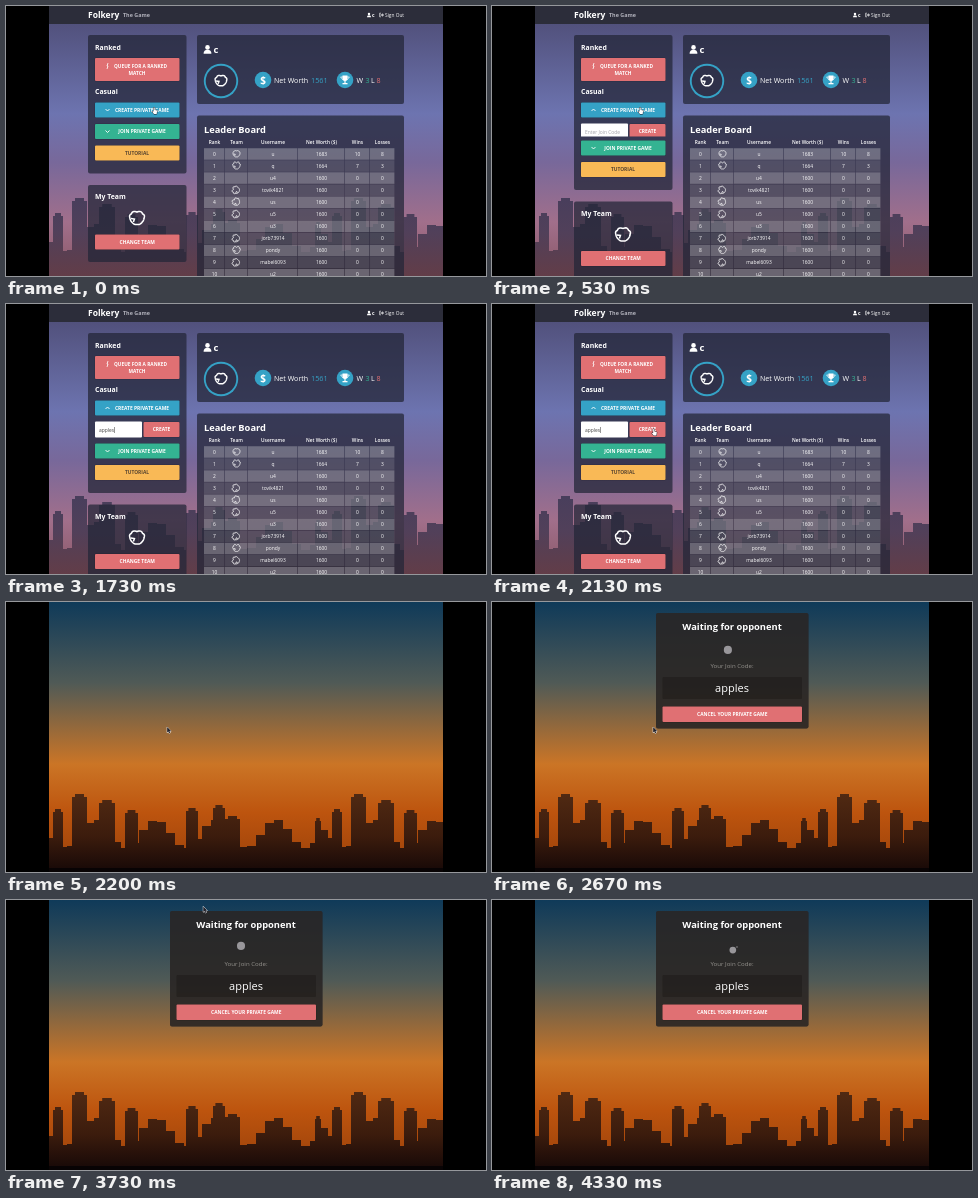
Recreate the animation shown at these times as an HTML page with a canvas. Size 480 by 270 pixels, loop 4390 ms.

```html
<!DOCTYPE html>
<html lang="en">
<head>
<meta charset="utf-8">
<title>Private game lobby</title>
<style>
html, body { margin: 0; width: 100%; height: 100%; overflow: hidden; background: #000; }
canvas { display: block; width: 480px; height: 270px; }
</style>
</head>
<body>
<canvas id="stage"></canvas>
<script>
const LOOP = 4390, TAU = Math.PI * 2;
const W = 480, H = 270, LEFT = 43, RIGHT = 437;
const FONT = '"Open Sans", "Noto Sans", sans-serif';
const RED = '#e07073', BLUE = '#35a2c6', GREEN = '#34b392', YELLOW = '#f9b956';

const canvas = document.getElementById('stage');
const ctx = canvas.getContext('2d');
const dpr = window.devicePixelRatio || 1;
canvas.width = W * dpr;
canvas.height = H * dpr;

const clamp = v => Math.max(0, Math.min(1, v));
const ease = v => { v = clamp(v); return v * v * (3 - 2 * v); };
const span = (t, a, b) => ease((t - a) / (b - a));
const mix = (a, b, k) => a + (b - a) * k;

function rect(x, y, w, h, fill, r = 0) {
  ctx.fillStyle = fill;
  ctx.beginPath();
  ctx.roundRect(x, y, w, h, r);
  ctx.fill();
}

function disc(x, y, r, fill) {
  ctx.fillStyle = fill;
  ctx.beginPath();
  ctx.arc(x, y, r, 0, TAU);
  ctx.fill();
}

function text(s, x, y, size, { color = '#fff', weight = 500, align = 'left' } = {}) {
  ctx.font = `${weight} ${size}px ${FONT}`;
  ctx.textAlign = align;
  ctx.fillStyle = color;
  ctx.fillText(s, x, y + size * 0.36);
}

const bold = (s, x, y, size, align = 'left', color = '#fff') =>
  text(s, x, y, size, { weight: 700, align, color });
const centered = (s, x, y, size, color) => text(s, x, y, size, { align: 'center', color });

function line(points, width = 1, color = '#fff') {
  ctx.strokeStyle = color;
  ctx.lineWidth = width;
  ctx.beginPath();
  points.forEach(([x, y]) => ctx.lineTo(x, y));
  ctx.stroke();
}

function fillSky(stops) {
  rect(LEFT, 0, RIGHT - LEFT, H, gradient(0, stops));
}

function gradient(top, stops) {
  const g = ctx.createLinearGradient(0, top, 0, H);
  stops.forEach(([at, color]) => g.addColorStop(at, color));
  return g;
}

// Low roofs follow a stepped wave; a few capped towers [x, width, roof] stand out
const TILE = 279, STEP = 9;
const TOWERS = [[47, 10, 210], [66, 15, 195], [93, 16, 201], [119, 13, 211],
  [180, 12, 209], [207, 12, 206], [219, 15, 217], [309, 6, 219]];

function skyline(stops) {
  ctx.fillStyle = gradient(190, stops);
  ctx.beginPath();
  for (let left = 0; left <= TILE; left += TILE) {
    for (let x = LEFT; x < LEFT + TILE; x += STEP) {
      const roof = Math.round(232 + 14 * Math.cos((x + STEP / 2) / 60 * TAU));
      ctx.rect(left + x, roof, STEP, H - roof);
    }
    for (const [x, w, roof] of TOWERS) {
      ctx.rect(left + x, roof, w, H - roof);
      ctx.rect(left + x + w * 0.2, roof - 3, w * 0.6, 4);
    }
  }
  ctx.fill();
}

// Outline of a hand: a rounded palm with four bumps for the fingers
function hand(x, y, size, reach = 1.1, angle = 0, width = 1.5) {
  ctx.save();
  ctx.translate(x, y);
  ctx.rotate(angle);
  ctx.scale(size / 16, size / 16);
  const points = [];
  for (let a = 0; a <= TAU + 0.1; a += 0.1) {
    const r = 6.2 + reach * Math.max(0, -Math.sin(a)) * Math.abs(Math.sin(4 * a));
    const py = Math.min(5.8, r * Math.sin(a));
    points.push([r * Math.cos(a) * (1.1 - 0.03 * py), py]);
  }
  line(points, width);
  line([[-6, 0], [-2.5, 0.5], [-3.5, 3.5]], width);
  ctx.restore();
}

function person(x, y, s) {
  disc(x, y - s * 0.25, s * 0.27, '#fff');
  ctx.beginPath();
  ctx.arc(x, y + s * 0.5, s * 0.46, Math.PI, 0);
  ctx.fill();
}

function chevron(x, y, up) {
  const d = up ? -1 : 1;
  line([[x - 2, y - d], [x, y + d], [x + 2, y - d]], 0.9);
}

function button(label, x, y, w, h, color, tx = x + w / 2, ink = '#fff') {
  rect(x - 0.5, y - 0.5, w + 1, h + 1, 'rgba(0,0,0,.18)', 1.5);
  rect(x, y, w, h, color, 1);
  bold(label, tx, y + h / 2, 4.9, 'center', ink);
}

const sideButton = (label, y, color, tx, ink) => button(label, 89, y, 84.5, 15, color, tx, ink);
const panel = (x, y, w, h) => rect(x, y, w, h, 'rgba(36,38,56,.74)', 2);

const NAMES = 'u q u4 tovik4821 us u5 u3 jorb73914 pondy mabel6093 u2'.split(' ');
const SCORES = { u: [1683, 10, 8], q: [1664, 7, 3] };
const COLUMNS = { Rank: 21, Team: 23, Username: 50, 'Net Worth ($)': 47, Wins: 25, Losses: 25 };

function teamIcon(i, x, y) {
  if (i % 4 === 2) return;
  const open = i % 7 === 1;
  const angle = i === 0 || open ? 0 : i === 4 ? -0.7 : -1.3;
  hand(x, y, 8, i === 0 ? 1 : 2.6, angle);
}

function leaderBoard() {
  panel(191, 109.5, 207, 170);
  bold('Leader Board', 198, 123.5, 9.3);
  let left = 198;
  Object.entries(COLUMNS).forEach(([title, width], c) => {
    const mid = left + width / 2;
    text(title, mid, 136, 4.8, { weight: 600, align: 'center' });
    NAMES.forEach((name, i) => {
      const y = 148 + i * 12.07;
      rect(left, y - 5.8, width - 0.6, 11.5, `rgba(255,255,255,${i % 2 ? 0.12 : 0.27})`);
      if (c === 1) teamIcon(i, mid, y);
      else centered([i, '', name, ...(SCORES[name] || [1600, 0, 0])][c], mid, y, 4.9);
    });
    left += width;
  });
}

function trophy(x, y) {
  disc(x, y, 8.3, BLUE);
  rect(x - 2.5, y - 4.5, 5, 5.5, '#fff', [0, 0, 2.5, 2.5]);
  rect(x - 0.6, y, 1.2, 3.5, '#fff');
  rect(x - 2.5, y + 3, 5, 1.3, '#fff');
  for (const d of [-1, 1]) line([[x + 2 * d, y - 3], [x + 4.4 * d, y - 3], [x + 2 * d, y]], 0.7);
}

function profile() {
  panel(191, 29, 207, 69);
  person(201.5, 43.5, 8.5);
  bold('c', 207.5, 43.5, 9.5);
  disc(215, 75, 17.2, BLUE);
  disc(215, 75, 15.3, '#2f314a');
  hand(215, 75, 13, 1.1, 0, 1.8);
  disc(257, 74, 8.3, BLUE);
  bold('$', 257, 74, 10, 'center');
  text('Net Worth', 268, 74.5, 7.1);
  text('1561', 305, 74.5, 7.3, { color: BLUE });
  trophy(339, 74);
  text('W', 350.5, 74.5, 7.1);
  text('3', 359.5, 74.5, 7.1, { color: GREEN });
  text('L', 365, 74.5, 7.1);
  text('8', 370.5, 74.5, 7.1, { color: RED });
}

function joinForm(t) {
  rect(89, 117.5, 47, 16, '#fff', 1);
  button('CREATE', 137.5, 118, 36, 15, RED);
  const typed = 'apples'.slice(0, Math.max(0, Math.floor((t - 1150) / 85) + 1));
  text(typed || 'Enter Join Code', 93, 126, 4.9, { color: typed ? '#444' : '#a3a3aa' });
  if (t > 1000) rect(93.3 + ctx.measureText(typed).width, 123, 0.5, 6, '#333');
}

function sidebar(t) {
  const row = 21.5, open = row * span(t, 380, 600);
  panel(82, 29, 98.5, 138.5 + open);
  bold('Ranked', 89, 42, 6.9);
  button('', 89, 52, 84.5, 23, RED);
  bold('QUEUE FOR A RANKED', 134.5, 60, 4.8, 'center');
  bold('MATCH', 131, 67, 4.8, 'center');
  line([[102, 57], [101, 60], [102, 60], [101, 63]], 0.8);
  bold('Casual', 89, 86, 6.9);

  const top = 96.5, below = top + open;
  sideButton('CREATE PRIVATE GAME', top, BLUE, 136);
  chevron(101.5, top + 7.5, t > 380);
  ctx.save();
  ctx.beginPath();
  ctx.rect(82, 114, 98, open);
  ctx.clip();
  joinForm(t);
  ctx.restore();
  sideButton('JOIN PRIVATE GAME', below + row, GREEN, 136);
  chevron(101.5, below + row + 7.5);
  sideButton('TUTORIAL', below + 2 * row, YELLOW, 131, '#5a4630');

  panel(82, 179 + open, 98.5, 77);
  bold('My Team', 89, 191 + open, 6.9);
  hand(131, 212.5 + open, 16.5);
  sideButton('CHANGE TEAM', 228.5 + open, RED);
}

function navBar() {
  rect(LEFT, 0, RIGHT - LEFT, 18, '#2c2d3a');
  bold('Folkery', 82, 9, 8.5);
  bold('The Game', 117, 9.3, 5.4, 'left', '#b3b3bd');
  person(363, 9, 4.5);
  bold('c', 366, 9, 5);
  line([[375, 7.2], [373.6, 7.2], [373.6, 10.8], [375, 10.8]], 0.6);
  line([[374.5, 9], [377.3, 9]]);
  line([[376, 7.6], [377.5, 9], [376, 10.4]], 0.7);
  text('Sign Out', 379, 9, 4.8);
}

function dashboard(t) {
  fillSky([[0, '#4c4a72'], [0.4, '#6d74b0'], [0.58, '#78689a'], [0.8, '#a16f8b'], [1, '#8a5866']]);
  skyline([[0, '#483e5c'], [0.45, '#51405a'], [1, '#623d48']]);
  navBar();
  sidebar(t);
  profile();
  leaderBoard();
}

// Two dots orbit one centre while they swell in turn
function spinner(t) {
  const turn = (t - 2670) / 994;
  for (const lag of [0, 0.5]) {
    const angle = (0.4 + turn + lag * 0.32) * TAU;
    const wave = (1 - Math.cos((0.47 + turn + lag) * TAU)) / 2;
    disc(240.2 + 5.3 * Math.cos(angle), 44.8 + 5.3 * Math.sin(angle), 4.1 * wave, '#98969a');
  }
}

function waiting(t) {
  fillSky([[0, '#0f3a59'], [0.3, '#505a56'], [0.6, '#cb7526'], [0.78, '#bd540e'], [1, '#98400a']]);
  skyline([[0, '#512a13'], [0.55, '#3c1c0d'], [1, '#160807']]);
  rect(LEFT, 266, RIGHT - LEFT, 4, '#080304');
  ctx.globalAlpha = span(t, 2340, 2460);
  panel(164, 11, 152.5, 115.5);
  rect(164, 11, 152.5, 115.5, 'rgba(44,38,28,.6)', 2);
  bold('Waiting for opponent', 240, 24.8, 9.35, 'center');
  spinner(t);
  centered('Your Join Code:', 240, 64, 6.1, '#96938e');
  rect(170.5, 75, 139.5, 22, 'rgba(20,18,16,.35)', 1);
  centered('apples', 240, 86.5, 11);
  button('CANCEL YOUR PRIVATE GAME', 170.5, 104.5, 139.5, 15.5, RED);
  ctx.globalAlpha = 1;
}

const ARROW = new Path2D('M0 0V5.6L1.3 4.5L2.1 6.4L3 6L2.2 4.2L3.9 4.1Z');
const FINGER = new Path2D('M0 0H1.2V2.5L3.6 3L3.2 6.6H.4L-1.4 4L0 4Z');

function pointer(shape, x, y) {
  const dark = '#22222c', arrow = shape === ARROW;
  ctx.save();
  ctx.translate(x, y);
  ctx.lineWidth = 0.9;
  ctx.strokeStyle = arrow ? '#fff' : dark;
  ctx.fillStyle = arrow ? dark : '#fff';
  ctx.stroke(shape);
  ctx.fill(shape);
  ctx.restore();
}

function iBeam(x, y) {
  line([[x, y - 3.2], [x, y + 3.2]], 0.7, '#333');
  for (const d of [-3.2, 3.2]) line([[x - 1, y + d], [x + 1, y + d]], 0.6, '#333');
}

// Pointer stops: [time, x, y]
const STOPS = [[560, 147.5, 101.5], [860, 124.5, 126], [1830, 124.5, 126], [2060, 161.2, 125],
  [3270, 161.2, 125], [3720, 197.3, 6.5], [3780, 197.3, 6.5], [3930, 202, -8]];

function cursor(t) {
  const typing = t > 1120 && t < 1800;
  if (typing) return;
  let [, x, y] = STOPS[0];
  STOPS.slice(1).forEach(([end, nx, ny], i) => {
    const k = span(t, STOPS[i][0], end);
    x = mix(x, nx, k);
    y = mix(y, ny, k);
  });
  if (t >= 2195) pointer(ARROW, x, y);
  else if (x < 136) iBeam(x, y);
  else pointer(FINGER, x, y);
}

function draw(t) {
  ctx.setTransform(dpr, 0, 0, dpr, 0, 0);
  rect(0, 0, W, H, '#000');
  ctx.save();
  ctx.beginPath();
  ctx.rect(LEFT, 0, RIGHT - LEFT, H);
  ctx.clip();
  (t < 2195 ? dashboard : waiting)(t);
  cursor(t);
  ctx.restore();
}

const began = performance.now();
function tick() {
  draw((performance.now() - began) % LOOP);
  requestAnimationFrame(tick);
}
tick();
</script>
</body>
</html>
```
